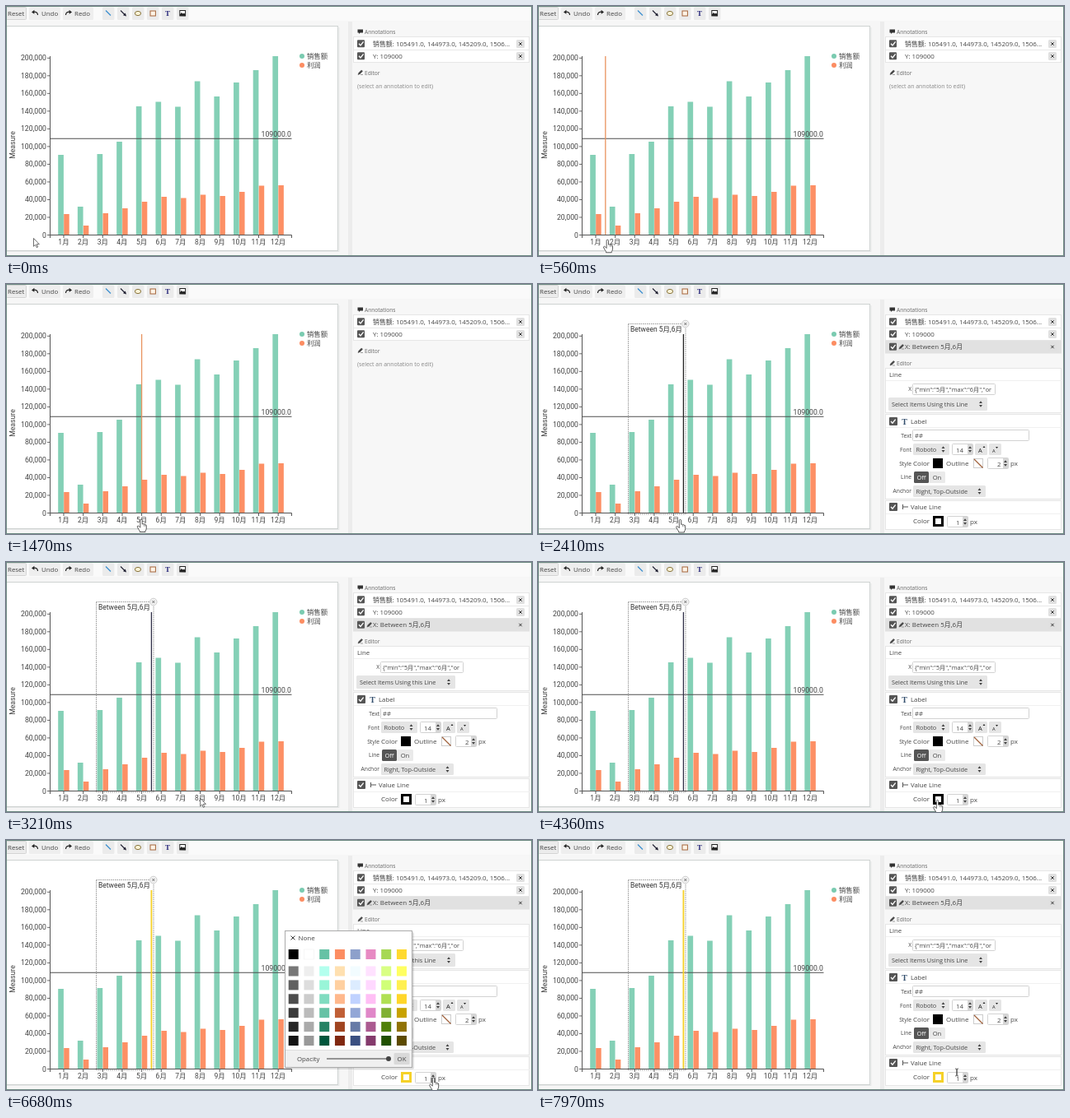
These frames come from a looping animation (638x304 px, 8 s). An HTML page:

```html
<!DOCTYPE html>
<html lang="en">
<head>
<meta charset="utf-8">
<title>Chart annotation editor</title>
<style>
  html, body { margin: 0; width: 100%; height: 100%; overflow: hidden; background: #f6f6f6; }
  svg { display: block; width: 638px; height: 304px; }
  text { font-family: "Open Sans", "Noto Sans CJK SC", "Noto Sans CJK", sans-serif; white-space: pre; }
  .chart text { font-family: Roboto, "Noto Sans CJK SC", "Noto Sans CJK", sans-serif; }
</style>
</head>
<body>
<svg id="stage" viewBox="0 0 638 304"></svg>
<script>
const LOOP = 8000;

// Markup helpers
const rect = (x, y, w, h, fill, more = '') =>
  `<rect x="${x}" y="${y}" width="${w}" height="${h}" fill="${fill}" ${more}/>`;
const text = (x, y, s, size = 7.8, fill = '#444', more = '') =>
  `<text x="${x}" y="${y}" font-size="${size}" fill="${fill}" ${more}>${s}</text>`;
const path = (d, stroke, width = 1, fill = 'none', more = '') =>
  `<path d="${d}" stroke="${stroke}" stroke-width="${width}" fill="${fill}" ${more}/>`;
const group = (id, body, more = '') => `<g id="${id}" ${more}>${body}</g>`;
const END = 'text-anchor="end"', MID = 'text-anchor="middle"';

const button = (x, y, w, h, fill = '#e5e5e5') => rect(x, y, w, h, fill, 'rx="1.5"');
const field = (x, y, w, h = 14) => rect(x + .5, y + .5, w - 1, h - 1, '#fff', 'stroke="#d2d2d2" rx="1"');
const updown = (x, y, fill = '#444') =>
  path(`M${x - 2} ${y - 1}l2-2.8 2 2.8zM${x - 2} ${y + 1}l2 2.8 2-2.8z`, 'none', 0, fill);
const spinner = (x, y) => rect(x - 3, y - 6, 6, 12, '#d6d6d6') + updown(x, y);
const cross = (x, y, r, stroke = '#444', w = 1) =>
  path(`M${x - r} ${y - r}l${2 * r} ${2 * r}m0 ${-2 * r}l${-2 * r} ${2 * r}`, stroke, w);
const check = (x, y, s = 9) =>
  rect(x, y, s, s, '#555', 'rx="1"') + path(`M${x + 2} ${y + s / 2}l2 2.2 3.6-4.6`, '#fff', 1.3);
const pencil = (x, y) => path(`M${x} ${y}l.8-2.2 3.4-3.4 1.4 1.4-3.4 3.4zM${x + 3} ${y}h3`, '#444', .5, '#444');
const select = (x, y, w, s) =>
  button(x, y, w, 14) + text(x + 3.5, y + 10, s, 7.3) + updown(x + w - 7.5, y + 7);
const label = (y, s) => text(453, y, s, 6.7, '#444', END);

function toolbar() {
  const tools = [
    path('M121 5.5l6 6', '#3c8fd0', 1.2),
    path('M139 5.5l5 5', '#223', 1.1) + path('M146 12.5l-1.2-4-2.8 2.8z', 'none', 0, '#223'),
    '<ellipse cx="160" cy="9" rx="3.6" ry="2.6" fill="#fff6d8" stroke="#86733c"/>',
    rect(175, 6, 6.4, 6, '#fdf3e6', 'stroke="#a5653a"'),
    text(196, 12, 'T', 9, '#26267a', 'text-anchor="middle" font-weight="bold" style="font-family:Liberation Serif,serif"'),
    rect(210.8, 5.5, 6.8, 6.4, '#fff', 'stroke="#222"') + path('M211 12v-2l2-2 1.6 1.6 1.4-1 1.6 1.6v2z', 'none', 0, '#222')
  ];
  return rect(0, 0, 638, 18, '#fafafa') +
    rect(.5, 1.5, 24, 15, '#ececec', 'stroke="#d4d4d4" rx="1"') + text(2, 12, 'Reset', 7.9) +
    button(28, 1.5, 38, 15.5, '#eeeeee') + button(69, 1.5, 37, 15.5, '#eeeeee') +
    path('M38.5 11q0-4.2-5-3.8', '#222', 1.2) + path('M31 7.6l3.4-2.8v5z', 'none', 0, '#222') +
    path('M72.5 11q0-4.2 5-3.8', '#222', 1.2) + path('M80 7.6l-3.4-2.8v5z', 'none', 0, '#222') +
    text(43, 12, 'Undo', 7.9) + text(83, 12, 'Redo', 7.9) +
    tools.map((icon, i) => button(117 + 18 * i, 1.5, 14.5, 15.5, '#ebebeb') + icon).join('');
}

// Chart geometry
const BASE = 278.5, month = i => 70 + 23.65 * i;
const sales = [181, 244, 180, 165, 122, 116.5, 122.5, 91.5, 110, 93, 78, 61];
const profit = [253, 267, 252, 246, 238, 232, 233.5, 229.5, 231, 226, 218.5, 218];

function chart() {
  let s = rect(-.5, 24.5, 403, 273, '#fff', 'stroke="#cfd3d2"') + path('M0 298.5H404V26', '#e4e6e6');
  sales.forEach((top, i) => {
    const x = month(i);
    s += rect(x - 6.8, top, 6.7, BASE - top, '#84d0b6') +
      rect(x + .2, profit[i], 6.5, BASE - profit[i], '#fd9065') +
      path(`M${x} 279v3`, '#555') + text(x, 290, i + 1 + '月', 8.5, '#444', MID);
  });
  for (let v = 0; v <= 10; v++) {
    const y = BASE - 21.52 * v;
    s += path(`M50 ${y}h3.5`, '#666') + text(49, y + 3, (v * 20000).toLocaleString('en-US'), 8.7, '#444', END);
  }
  return s + path(`M53.5 61V${BASE}M53.5 282v-3.5H346.5v3.5`, '#555') +
    text(0, 0, 'Measure', 8.7, '#444', 'text-anchor="middle" transform="translate(11 169) rotate(-90)"') +
    '<circle cx="359" cy="61" r="3" fill="#7acbb0"/><circle cx="359" cy="72" r="3" fill="#fc8d62"/>' +
    text(365, 64, '销售额', 8.4) + text(365, 75, '利润', 8.4) +
    path('M53 161.3H346.5', '#4c4c4c', 1.1) + text(346, 158.5, '109000.0', 8.7, '#444', END);
}

const mark = () =>
  rect(109.5, 48.5, 69.5, 231.5, 'none', 'stroke="#999" stroke-dasharray="1.5 1"') +
  text(112, 58, 'Between 5月,6月', 8.5, '#333') +
  '<circle cx="178.8" cy="48.5" r="4.3" fill="#f2f2f2" stroke="#bbb" stroke-width=".7"/>' + cross(178.8, 48.5, 1.5, '#555', .8);

const row = (y, s) => check(426, y + 3.2) + text(445, y + 10.5, s, 7.95) +
  button(619, y + 3, 10, 10, '#e0e0e0') + cross(624, y + 8, 1.7, '#333');
const editorTitle = y => pencil(427, y) + text(435, y, 'Editor', 6.6, '#666');
const panel = (y, h) => rect(421.5, y + .5, 213, h, '#fff', 'stroke="#e6e6e6"');

const sidebar = () =>
  rect(415, 19, 5, 285, '#ececec') + rect(420, 19, 218, 285, '#f7f7f7') +
  path('M426.500 28.5h6.5v4h-3.500l-1.500 1.500v-1.500h-1.500z', 'none', 0, '#333') +
  text(435, 34, 'Annotations', 6.6, '#666') +
  panel(37, 31) + path('M422 53.5H635', '#e8e8e8') +
  row(38, '销售额: 105491.0, 144973.0, 145209.0, 1506...') + row(53, 'Y: 109000');

const idle = () => editorTitle(83.5) + text(426, 100, '(select an annotation to edit)', 6.9, '#888');

const editor = () =>
  rect(421, 69, 214, 15.500, '#e1e1e1') + row(68.5, 'X: Between 5月,6月') + pencil(438, 79) +
  editorTitle(99) +
  panel(102, 54) + text(426, 113, 'Line', 7.8) + path('M422 117.5H635', '#f0f0f0') +
  label(130, 'X') + field(454, 121, 101) + text(457, 131, '{"min":"5月","max":"6月","or', 7.2) +
  button(425, 138, 120, 16) + text(429, 149, 'Select Items Using this Line', 7.3) + updown(537, 146) +
  panel(158, 103) + path('M422 174.5H635', '#f0f0f0') + check(426, 162, 10) +
  text(444.500, 171, 'T', 10, '#35506e', 'text-anchor="middle" font-weight="bold" style="font-family:Liberation Serif,serif"') +
  text(452, 170, 'Label', 7.8) +
  label(187, 'Text') + field(454, 177, 142) + text(457, 187, '##', 7.6) +
  label(204, 'Font') + select(455, 194, 44, 'Roboto') +
  field(502, 194, 26) + text(507, 204.5, '14') + spinner(524, 201) +
  button(530, 194, 15, 14) + text(534, 204.5, 'A', 7.5, '#222') + path('M539.5 199l1.500-2 1.500 2z', 'none', 0, '#222') +
  button(547, 194, 15, 14) + text(551, 204.5, 'A', 5.6, '#222') + path('M555 198l1.500 2 1.500-2z', 'none', 0, '#222') +
  label(220.5, 'Style') + text(455, 221, 'Color', 8) + rect(479, 212, 12, 12, '#000') +
  text(495, 221, 'Outline', 8) + rect(528.5, 212.5, 11, 11, '#fff', 'stroke="#ccc"') + path('M529 213l10.5 10.5', '#a0623c', 1.3) +
  field(545, 211, 26) + text(557, 221.5, '2') + spinner(567, 218) + text(573, 221, 'px', 8) +
  label(237, 'Line') + button(456, 228, 18, 14, '#555') + text(465, 238, 'Off', 7.6, '#fff', MID) +
  button(474, 228, 20, 14, '#eaeaea') + text(484, 238, 'On', 7.6, '#444', MID) +
  label(254, 'Anchor') + select(455, 245, 88, 'Right, Top-Outside') +
  panel(263, 35) + path('M422 279.5H635', '#f0f0f0') + check(426, 266, 10) +
  path('M442.500 268v6M443 271h6', '#555') + text(452, 274, 'Value Line', 7.8) +
  text(455, 291, 'Color', 8) + rect(480.5, 283.5, 10, 10, '#fff', 'id="swatch" stroke-width="3"') +
  field(496, 282, 26) + text(507, 292.5, '1') + spinner(518, 289) +
  rect(515, 289, 6, 6, '#8a8a8a', 'id="press"') + text(524, 291.5, 'px', 8);

// One string per palette column, from base colour down to the darkest shade
const palette = [
  '000 777 606060 4d4d4d 3a3a3a 262626 131313',
  'fff eee ddd ccc bbb aaa 999',
  '66c2a5 b3ffee 99f5d8 80dcc0 66c2a5 268264 00553b',
  'fc8d62 ffe0b0 ffd0a0 ffb88c c05f36 a04420 802810',
  '8da0cb f2fcff dcecff c0d2ff 93a7d6 667aa6 3a4f80',
  'e78ac3 ffe2ff ffd8ff ffbff5 e087c8 ab5a90 843a6c',
  'a6d854 d9ff84 d0ff78 b0e054 80b034 4f8008 205000',
  'ffd92f ffff62 fff050 ffd62a c8a200 907204 5c4a00'
].map(column => column.split(' '));

const popup = () =>
  rect(339, 112, 156, 167, '#000', 'opacity=".12" rx="2"') +
  rect(338.5, 110.5, 154, 166, '#fff', 'stroke="#aaa"') +
  rect(339, 255, 153, 21, '#f0f0f0') + path('M339 255.5h153', '#ddd') +
  cross(348, 119, 2.4, '#333') + text(354.500, 122, 'None', 8) +
  palette.map((column, c) => column.map((color, r) =>
    rect(342.7 + 18.75 * c, r ? 136.6 + 16.9 * r : 133, 12, 12, '#' + color,
      color === 'fff' ? 'stroke="#f0f0f0" stroke-width=".6"' : '')).join('')).join('') +
  text(353, 269, 'Opacity', 7.8) + path('M389 266H464', '#777', 1.5) + '<circle cx="464" cy="266" r="3" fill="#444"/>' +
  button(470.5, 259, 19, 14, '#d9d9d9') + text(480, 269, 'OK', 7.8, '#444', MID);

const cursors = {
  arrow: path('M0 0V9.8L2.2 7.8 3.7 11.2 5.2 10.5 3.7 7.2H6.8Z', '#333', .7, '#fff'),
  hand: path('M-1.2 9.500V1.2a1.2 1.2 0 0 1 2.4 0V6q1.1-.9 1.8.3 1.2-.7 1.7.5 1.5-.4 1.5 1.2V11q0 2-1.3 3.4V15.500H-1.8V14.300Q-3 12.800-4.6 9.800q-.6-1.500.6-1.800 1 0 2.800 2.200z',
    '#333', .8, '#fff') + path('M3 6.300v2.500M4.700 6.800v2.200', '#555', .5),
  beam: path('M-2-4.500q2 0 2 1v7q0 1 2 1M2-4.500q-2 0-2 1v7q0 1-2 1', '#333', .8)
};

const stage = document.getElementById('stage');
stage.innerHTML = rect(0, 0, 638, 304, '#f6f6f6') + toolbar() +
  group('chart', chart() + group('mark', mark()) + path('M0 61V278', '#000', 1.3, 'none', 'id="guide"'), 'class="chart"') +
  sidebar() + group('idle', idle()) + group('editor', editor()) + group('popup', popup()) +
  rect(.5, .5, 637, 303, 'none', 'stroke="#6d8a82"') +
  Object.entries(cursors).map(([name, shape]) => group(name, shape)).join('');

const el = id => document.getElementById(id);
const show = (id, on) => el(id).setAttribute('visibility', on ? 'visible' : 'hidden');

// Pointer path: time, x, y
const track = [
  [0, 33.5, 282.5], [70, 33.5, 282.5], [840, 106, 285], [910, 106, 285],
  [1350, 169, 286], [1610, 158, 286], [1740, 158, 286], [1940, 172.5, 286.5],
  [3000, 172.5, 286.5], [3760, 507.5, 290], [3830, 507, 290], [3970, 484.5, 289.5],
  [4690, 484.5, 289.5], [5000, 474, 188], [5100, 478, 191], [5300, 478, 191],
  [5370, 483, 206], [5440, 481.5, 198.5], [5640, 481.5, 198.5], [6100, 546, 262],
  [6410, 518.5, 289], [6680, 518.5, 289], [6950, 533, 281], [7290, 519, 286],
  [7760, 519, 286], [7970, 508, 282.5]
];
// Pointer shape from each time on
const shapes = [
  [0, 'arrow'], [300, 'hand'], [3070, 'arrow'], [3900, 'hand'], [4760, 'arrow'],
  [6340, 'hand'], [6800, 'arrow'], [7220, 'hand'], [7900, 'beam']
];

function pointer(t) {
  const i = track.findIndex(k => k[0] > t);
  if (i < 0) return track[track.length - 1].slice(1);
  const [t0, x0, y0] = track[i - 1], [t1, x1, y1] = track[i];
  const u = (t - t0) / (t1 - t0), e = u * u * (3 - 2 * u);
  return [x0 + (x1 - x0) * e, y0 + (y1 - y0) * e];
}

function draw(t) {
  const [x, y] = pointer(t);
  const placed = t >= 2340, yellow = t >= 5700;
  const shape = shapes.filter(k => k[0] <= t).pop()[1];
  for (const name in cursors) show(name, name === shape);
  el(shape).setAttribute('transform', `translate(${x} ${y})`);

  // The guide snaps to months and to the gaps between them
  const half = 23.65 / 2;
  const snapped = placed || t >= 1940 ? month(4.5) : month(0) + Math.round((x - month(0)) / half) * half;
  const guide = el('guide');
  guide.setAttribute('transform', `translate(${snapped})`);
  guide.setAttribute('stroke', yellow ? '#f5d128' : t >= 3070 ? '#303048' : placed ? '#222' : '#e8935f');
  guide.setAttribute('stroke-width', yellow ? 1.8 : 1.3);
  show('guide', t >= 300);

  show('mark', placed);
  show('editor', placed);
  show('idle', !placed);
  show('popup', t >= 4430 && t < 6820);
  show('press', t >= 6540 && t < 6820);
  el('swatch').setAttribute('stroke', yellow ? '#f5d128' : '#000');
}

const start = performance.now();
(function tick() {
  draw((performance.now() - start) % LOOP);
  requestAnimationFrame(tick);
})();
</script>
</body>
</html>
```
